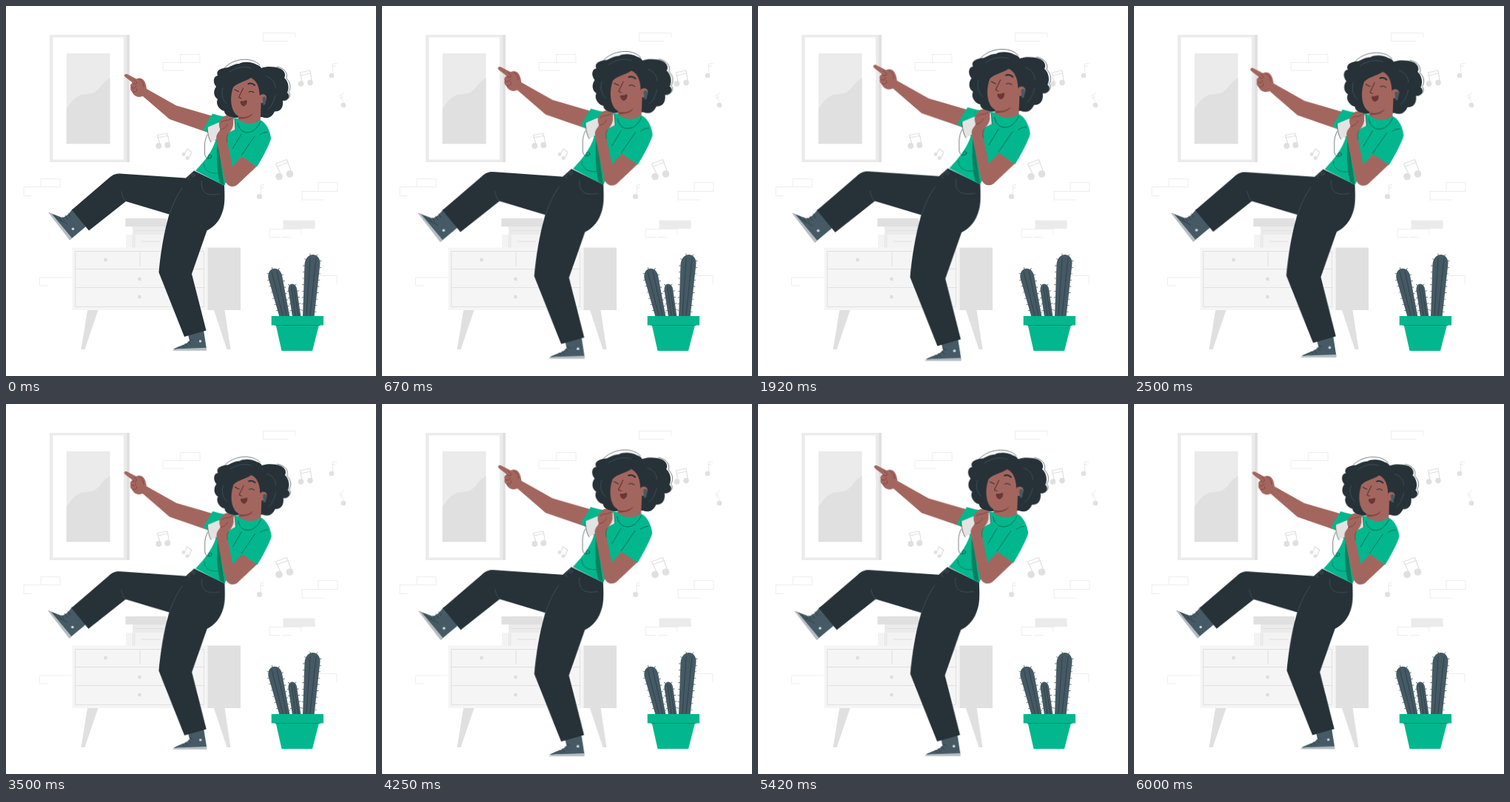
Write an HTML page that moves like this. It is 500 by 500 pixels and loops after 6040 ms.

```html
<!DOCTYPE html>
<html lang="en">
<head>
<meta charset="utf-8">
<title>Singing along</title>
<style>
  html, body { margin: 0; width: 100%; height: 100%; overflow: hidden; background: #fff; }
  svg { display: block; width: 100%; height: 100%; }
  .line { fill: none; stroke-linecap: round; stroke-linejoin: round; }
  .brick { stroke: #ededed; stroke-width: 1; }
  .note { stroke: #e0e0e0; stroke-width: 1.2; }
  .note circle { fill: #e0e0e0; stroke: none; }
  .faint { stroke: #e6e6e6; stroke-width: .8; }
  .thin { stroke: #263238; stroke-width: .6; }
  .seam { stroke: #455a64; stroke-width: .7; }
  .skin { fill: #a3665f; }
  .crease { stroke: #7a3f3c; stroke-width: .8; }
  .green { fill: #02b78d; }
  .dark { fill: #263238; }
  .slate { fill: #455a64; }
  .sole { fill: #b4bdc2; }
  .spikes { fill: none; stroke: #263238; stroke-width: 4.4; stroke-dasharray: .6 8; }
  #singer { transform-origin: 220.5px 269px; animation: pulse 6040ms linear infinite; }
  @keyframes pulse {
    0%, 60%, 100% { transform: scale(1); }
    20%, 80% { transform: scale(1.1); }
  }
</style>
</head>
<body>
<svg viewBox="0 0 500 500">
  <g class="line brick">
    <path d="M391 42V36.500H347.500V47.500H381"/>
    <path d="M235.500 76V65.500H262V76M212 77V87H241M212 76.500H262"/>
    <path d="M47 244V233.500H73V244M68 244.500H24V256.500H34M47 244.500H73"/>
    <path d="M88 367H45.500V378H56"/>
    <path d="M422 250V238.500H448V250M400 250.500V262H430M400 250.500H448"/>
    <path d="M399 307V301.500H356V312.500H370M374 312.500H385"/>
    <path d="M424 364.500H447V376"/>
  </g>
  <path fill="#ebebeb" d="M374.500 289.500h43v11.500h-43z"/>

  <!-- framed picture -->
  <path fill="#ebebeb" d="M59 39h104.500v172H59z"/>
  <path fill="#e0e0e0" d="M163 39h4v172h-4z"/>
  <path fill="#fff" d="M63.500 42.500H159V207.500H63.500z"/>
  <path fill="#ebebeb" d="M81.700 64H140.500V186.300H81.700z"/>
  <path fill="#e0e0e0" d="M81.700 139C88 130 94 120 107 119C129 118 124 107 140.500 97V186.300H81.700z"/>

  <!-- music notes -->
  <g class="line note">
    <path d="M400.500 105L397.500 90L411 87L413.500 103M398 94L411.500 91"/>
    <circle cx="398.500" cy="105" r="3.800"/><circle cx="411" cy="103.500" r="3.800"/>
    <path d="M208.500 188L204.500 174.500L218 172L221 187M205.500 178L218.500 175"/>
    <circle cx="206.300" cy="189" r="3.900"/><circle cx="218.300" cy="188" r="3.900"/>
    <path d="M372 229L364.500 213L379.500 207.500L386 225M366 217L381 211.500"/>
    <circle cx="369" cy="230.500" r="4.800"/><circle cx="383.500" cy="227" r="4.800"/>
    <path d="M241.500 200L245 193L251 197.500L247 206"/>
    <circle cx="240" cy="200.500" r="2.400"/><circle cx="245" cy="205.500" r="2.400"/>
  </g>
  <g class="line note faint">
    <path d="M442 93L441 78.500L447 77.500M441.500 82L446 81"/>
    <circle cx="440" cy="94" r="3.300"/>
    <path d="M458 133L451 121L457 117M452.500 124L455.500 122"/>
    <circle cx="456" cy="134" r="3.300"/>
    <path d="M344.500 257L344 242.500L349 241M344.500 246L348 245"/>
    <circle cx="342.500" cy="257.500" r="3.500"/>
  </g>

  <!-- cabinet and books -->
  <path fill="#e0e0e0" d="M110 411h14.500L106.500 464h-5zM281 411h14.500L303.500 464h-5zM161.500 287h55.500v11h-55.500z"/>
  <path fill="#ebebeb" d="M171 298h50v11h-50z"/>
  <path fill="#f3f3f3" d="M162 309h68v18h-68z"/>
  <path fill="#f5f5f5" d="M89.500 326.500h183v84.500h-183z"/>
  <path fill="#e0e0e0" d="M272.500 326.500h44.500v84.500h-44.500z"/>
  <g class="line" stroke="#e0e0e0">
    <path d="M94 331.500H267.500V406.500H94zM94 355.500H267.500M94 380.500H267.500M181 332V351"/>
    <path d="M175 303.500H221M171.500 310V326M173.800 310V326M183 318H208"/>
  </g>
  <g fill="#dedede">
    <circle cx="134.500" cy="343" r="2.400"/><circle cx="180.500" cy="369" r="2.400"/><circle cx="180.500" cy="393" r="2.400"/>
  </g>

  <!-- cactus -->
  <defs>
    <path id="c1" d="M369.500 420L354.500 368C352 352 370 350 373 364L383.500 420z"/>
    <path id="c2" d="M387 420L381.500 384C381 373 391 373 393 382L398.500 420z"/>
    <path id="c3" d="M401 420L403.500 349C405 332 424.500 332 424.500 348L416.500 420z"/>
  </defs>
  <g class="spikes"><use href="#c1"/><use href="#c2"/><use href="#c3"/></g>
  <g class="slate"><use href="#c1"/><use href="#c2"/><use href="#c3"/></g>
  <path class="line thin" d="M374 418L359 359M379 418L366 358M391 418L386 379M395 418L389 379M406 418L411 341M411 418L419 341"/>
  <path class="green" d="M364.700 431H423L414 466H372.500zM358.700 419H429V431.500H358.700z"/>
  <path class="line" stroke="#078268" stroke-width=".8" d="M364 431.500H424"/>

  <g id="singer">
    <!-- raised foot -->
    <path class="slate" d="M57.700 279L76 286C81 285 86 280 90 274L108 298L86.500 316z"/>
    <path class="sole" d="M57.300 279L61.500 280.500L89 313.500L86 316.500z"/>
    <path class="line thin" d="M72 285L75 290M76 285L79 290M80 283L83 288M84 280L87 285M66 283C72 292 78 290 83 295"/>
    <circle cx="90.500" cy="301.300" r="1.700" fill="#cfd8dc"/>

    <!-- standing foot -->
    <path class="slate" d="M246 444L267 438L271 463.500L226 464C234 459 244 458 248 452z"/>
    <path class="sole" d="M224.700 465.700C227 463.500 232 463 239 463L271 461.800V465.700z"/>
    <path class="line thin" d="M238 458L241 461M242 456L245 460M246 453L250 457M248 450L252 452"/>
    <circle cx="262.500" cy="453" r="1.700" fill="#cfd8dc"/>

    <!-- pointing arm -->
    <path class="skin" d="M280 149L230 134.500L190 112C189 103 186 98 181 97.500C179 97.500 177.500 98 176 98.500L164 92.300C160.500 91 158.500 94 161.500 96.200L171.500 104C167.500 105 168 108 168.500 110C167.500 113 169 115 170.500 116C171.500 120 176 123 180 123L185 122L221 153L273 171z"/>
    <path class="line crease" d="M173 99.500L176.500 102.500C178 105 174 107 170.500 103.500M169 110C172 112 176 111 175.500 108M171 116C175 117 178 115 176.500 112M180 99C184 101 186 105 186 109"/>

    <!-- hair -->
    <path class="dark" d="M284 109C279 103 280 95 286 94C283 87 290 84 300 83C306 80 310 78 315 78C321 74 334 76 338 79C342 80 344 82 345 84C352 81 364 82 369 84C376 86 379 93 376 97C382 102 383 112 380 117C385 121 382 128 374 128C375 137 371 143 363 142.500C359 151 353 153 346 150L309 151C300 151 295 146 295 142C287 140 283 131 286 126C280 122 280 114 284 109z"/>
    <path class="line thin" d="M294 85C306 70 333 68 343 80M366 82C377 84 381 91 379 98C385 104 385 111 382 116C386 121 382 127 376 128"/>
    <path class="line seam" d="M302 89C312 82 324 81 331 84M293 111C290 119 293 128 298 132M352 95C360 98 364 104 364 110M364 121C361 130 359 136 354 139"/>

    <!-- head and neck -->
    <path class="skin" d="M314 143L345 122L343.500 160H313z"/>
    <path fill="#7e4541" d="M315 149.500C323 150 330 147 334 144C332 150 325 153 314.500 152.500z"/>
    <path class="skin" d="M309 105C304 115 302 130 307 141C310 149 319 152 327 149C336 145 342 137 344 129L343 120C343 110 340 102 332 96C323 95 313 99 309 105z"/>
    <path class="dark" d="M304 114C309 104 321 103.500 331 97C339 101 342 108 343 122L352 126L360 112L342 88L312 88z"/>
    <path class="skin" d="M343 121C346 118 352 119 352 124C352 130 347 133 343 130z"/>
    <path class="line" stroke="#263238" d="M309 113L314.500 115.700M328 116.300C330 114.800 333 115.500 335 117"/>
    <path class="line" stroke="#263238" stroke-width="2" d="M327.500 105.200C330 104 333 104.500 336 107"/>
    <path class="line" stroke="#57302f" d="M320.500 111L314.500 123.500L318 125"/>
    <path fill="#6b3836" stroke="#4a2524" stroke-width=".6" d="M317 129C319 129.500 323 128.500 325 127.500C326 133 322 136 319.500 134.500C317.500 133 317 130.500 317 129z"/>
    <path class="slate" d="M346.500 124C348 121.500 351 122 351.500 125L350.500 133L347.500 134z"/>

    <!-- trousers -->
    <path class="dark" d="M89 275.500L139 232.500C144 228 148 226 154 226.500L243 232.500L254 222.500L295 242.500C295.500 255 296 266 293.500 275C289.500 290 282 298 271.500 303.500L251 362L270.500 438.500L241 447L206.500 360C208.500 337 213 307 220.500 281.500L162 264L112 303.500z"/>
    <path class="line seam" d="M264.500 236.500C263 245 266 252 273 254C278 255.500 283 255 288 254M238 246C231 256 225 268 221 281M156 251C157 256 158 260 162 264M254 223L246 233L249 235"/>
    <circle class="line seam" cx="253.500" cy="228.500" r="1.900"/>

    <!-- shirt -->
    <path class="green" d="M279 145.500L290 148.500L313 152C320 160 335 161 343.500 154C352 158 357 169 358 179C357 185 347 205 339 217.500L318 204L303 225L295 243L256 222.500C268 210 279 196 283 182L273 171L266 167z"/>
    <path fill="#07815f" d="M286 181L294 236L295 242.500L289 239C285 226 284 200 286 181z"/>
    <path class="line" stroke="#0b5f4f" stroke-width=".8" d="M336 176L318 202M343 174C346 171.500 350 170.500 353 170.500M318 173L306 193M313 158C316 176 336 175 343.500 157"/>
    <path class="line" stroke="#0b5f4f" stroke-width=".6" d="M267.500 213C267 222 275 227 286 226"/>
    <circle class="line thin" cx="275.500" cy="203.500" r="2.200"/>

    <!-- phone and bent arm -->
    <path class="line thin" d="M272 174C267 184 269 190 268.500 198C268.500 204 271 207 274 206"/>
    <path fill="#e3e3e3" d="M272 164L286 158L309 152.500L310 166.500L295 174L277 184C274 180 272.500 172 272 164z"/>
    <path class="line thin" d="M272 164C272.500 172 274 180 277 184M309 152.500L310 166.500"/>
    <path class="skin" d="M284.500 181C283 174 287 171 289.500 167C286 159 289 153 293 151C295 147 300 147.500 302 149.500C307 149 308 154 307 157C308 163 304 169 300 173C299 177 298 180 299 184L306 217L318.500 203L338.500 217L312 242C306 246 299 244 296 236z"/>
    <path class="line crease" d="M291 157C295 153 300 156 305 152M289.500 167C293 167 298 164 299 160M299 184C298 180 298 177 300 173"/>
  </g>
</svg>
</body>
</html>
```
